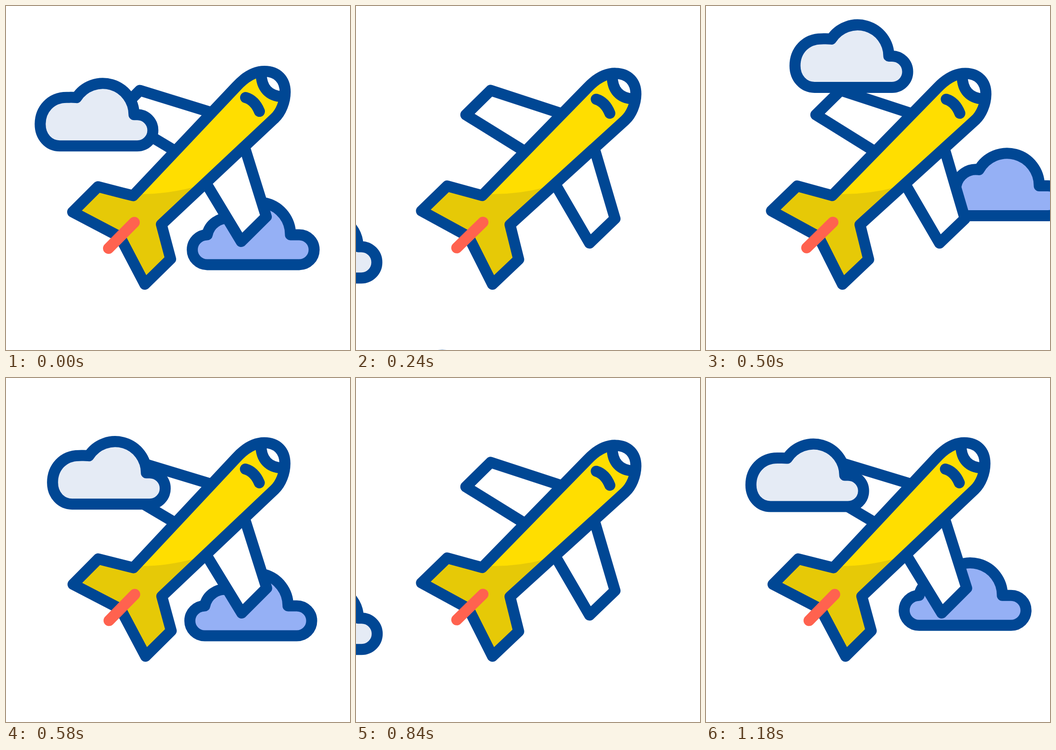
An HTML page that plays this animation: 748x748 px, repeating every 1200 ms.

```html
<!DOCTYPE html>
<html lang="en">
<head>
<meta charset="utf-8">
<title>Airplane</title>
<style>
  html, body { margin: 0; width: 100%; height: 100%; overflow: hidden; background: #fff; }
  svg { display: block; width: 100vw; height: 100vh; }
  .line { fill: none; stroke: #004794; stroke-width: 24; stroke-linecap: round; stroke-linejoin: round; }
</style>
</head>
<body>
<svg viewBox="0 0 748 748">
  <defs>
    <path id="body" d="M276.5 412.5L500.5 175.5C520 154 541 142 562 142C590 142 607 160 607 187C607 208 598 231 584 244L338 475L358 550L302 605L248 502L145 448L200 393Z"/>
    <clipPath id="inside"><use href="#body"/></clipPath>
  </defs>

  <path id="lowCloud" class="line" style="fill:#95b0f5" d="M439 496A44 44 0 0 1 489 461A70 70 0 0 1 620 496H639A32.5 32.5 0 0 1 639 561H439A32.5 32.5 0 0 1 439 496Z"/>

  <g id="plane">
    <path class="line" style="fill:#fff" d="M440 229.5L291 183.5L238 237.5L360 310.5"/>
    <path class="line" style="fill:#fff" d="M439 392L511.5 512L566 458L521 314"/>
    <use href="#body" fill="#ffde00"/>
    <g clip-path="url(#inside)">
      <path fill="#e6c907" d="M100 370L285 409Q350 410 415 392V640H100Z"/>
      <path fill="#fff" d="M555 147C555 178 572 196 601 197L595 155Z"/>
      <path class="line" d="M555 147C555 178 572 196 601 197"/>
    </g>
    <use href="#body" class="line"/>
    <path class="line" d="M521 199Q541 205 551 229"/>
    <path class="line" style="stroke:#ff624f" d="M279 470.5L223 527"/>
  </g>

  <path id="highCloud" class="line" style="fill:#e5ebf5" d="M154.500 198C147 197 140 197.500 133 197.500C98 197.500 75.500 224 75.500 256C75.500 283 94 303 118 303H286.500A34 34 0 0 0 286.500 235H279.500A68 68 0 0 0 154.500 198Z"/>
</svg>
<script>
  const LOOP = 1200, PASS = 600, ENTER = 300, SHAKE = 200;
  const get = id => document.getElementById(id);
  const plane = get('plane');

  // Offsets from the drawn place: where a cloud enters and where it leaves.
  const clouds = [
    { el: get('highCloud'), from: [350, -370.5], to: [-342.5, 359] },
    { el: get('lowCloud'), from: [384.5, -367.5], to: [-451, 416] }
  ];

  // The first pass is straight; the second goes through the drawn place.
  function cloudOffset({ from, to }, t) {
    const age = (t - ENTER + LOOP) % LOOP;
    if (age < PASS) return from.map((a, i) => a + (to[i] - a) * age / PASS);
    const p = (age - PASS) / PASS * 2 - 1;
    return p < 0 ? from.map(a => -a * p) : to.map(b => b * p);
  }

  function draw(now) {
    const t = now % LOOP;
    for (const cloud of clouds)
      cloud.el.setAttribute('transform', `translate(${cloudOffset(cloud, t)})`);

    const phase = 0.9;
    const angle = 0.78 * (Math.cos(phase) - Math.cos(t / SHAKE * 2 * Math.PI + phase));
    plane.setAttribute('transform', `rotate(${angle} 295 287)`);
    requestAnimationFrame(draw);
  }
  draw(0);
</script>
</body>
</html>
```
